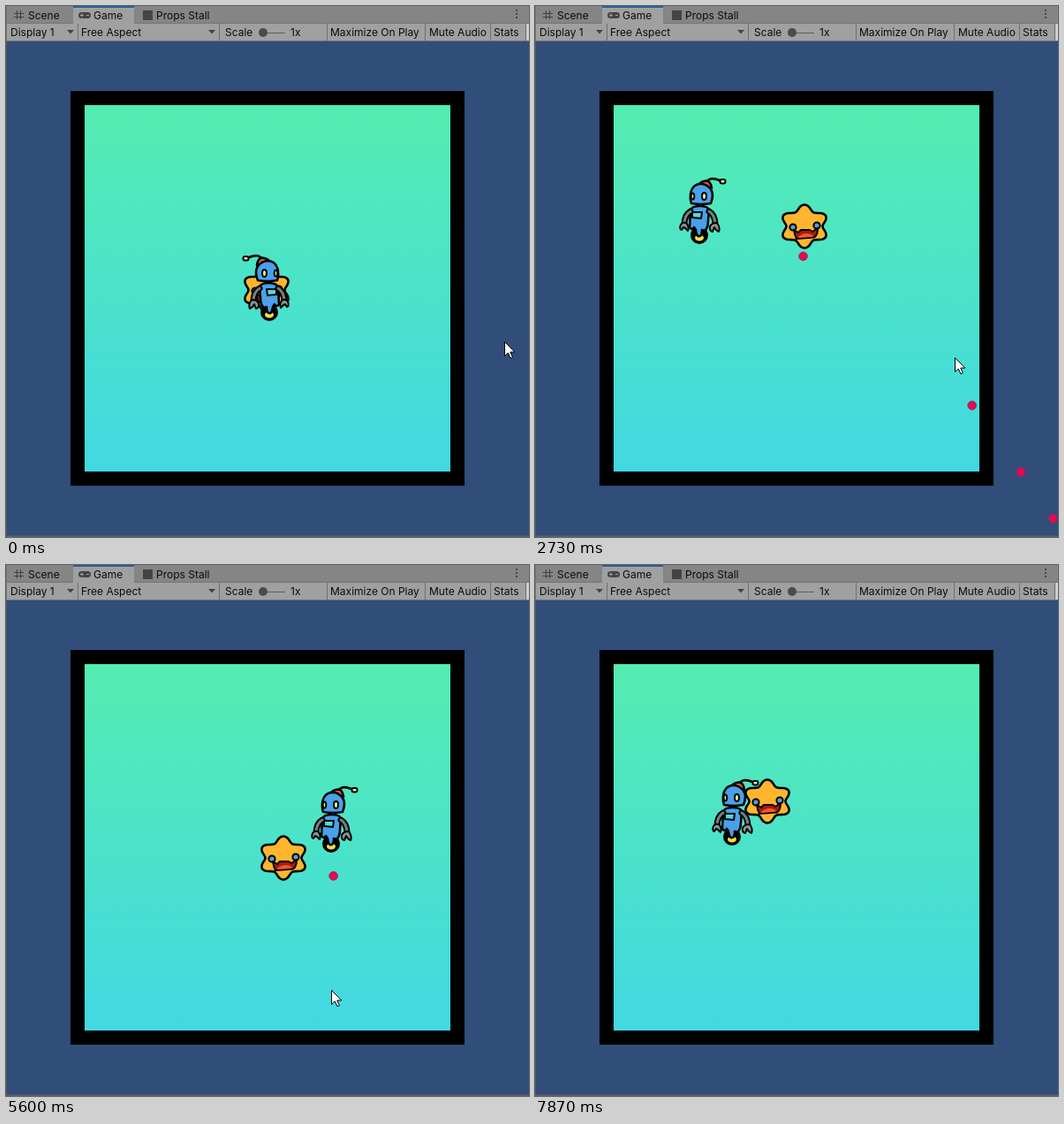
Write an HTML page that moves like this. It is 592x600 px and loops after 7.94 s.

```html
<!DOCTYPE html>
<html lang="en">
<head>
<meta charset="utf-8">
<title>Robot arena</title>
<style>
  html, body { margin: 0; width: 100%; height: 100%; overflow: hidden; background: #314d79; }
  svg { display: block; width: 592px; height: 600px; }
  text { font: 12px Inter, Roboto, sans-serif; fill: #0b0b0b; }
  .ink { stroke: #000; stroke-width: 2.6; stroke-linejoin: round; stroke-linecap: round; }
  .thin { stroke-width: 2; }
  .sep { stroke: #707070; }
</style>
</head>
<body>
<svg viewBox="0 0 592 600">
  <defs>
    <linearGradient id="floor" x2="0" y2="1">
      <stop stop-color="#54edb1"/>
      <stop offset="1" stop-color="#42d8e2"/>
    </linearGradient>
  </defs>

  <rect width="592" height="600" fill="#314d79"/>
  <rect x="73" y="96" width="446" height="446"/>
  <rect x="89" y="112" width="414" height="414" fill="url(#floor)"/>

  <g id="flower" class="ink">
    <path id="petals" fill="#ffb62e"/>
    <g class="thin">
      <circle cx="-13" cy="1" r="3.6" fill="#4a9fe8"/>
      <circle cx="14" cy="-1" r="3.6" fill="#4a9fe8"/>
      <path fill="#a81c0c" d="M-12 4L-7 7L-4 4H6L9 6L15 2Q15 10 11 12.5L-9 14Q-11 10-12 4Z"/>
    </g>
    <path fill="#f4572c" stroke="none" d="M-7 12Q1 5 10 10.500L8 12L-6 13Z"/>
  </g>

  <g id="shots" fill="#f0044e" stroke="#86305c"></g>

  <g id="robot" class="ink">
    <path fill="none" d="M-23 4Q-11-1-8 7"/>
    <rect x="-29.500" y="3" width="6" height="4.500" rx="2" class="thin" fill="#f8edc0"/>
    <path fill="#e0564e" d="M-14 13Q-13 5-8 4.500Q-2 5 1 9Z"/>
    <circle cy="66" r="8.700" fill="#000"/>
    <ellipse cy="69" rx="5" ry="3.500" fill="#f5dc4a" stroke="none"/>
    <path fill="none" stroke-width="3" d="M-2 30V35"/>
    <path fill="#4aa0ea" d="M-11 37Q-9 33-1 33Q9 33 10 38L11 57Q8 61 6 57L4 60Q3 68 0 67Q-3 67-3 60L-6 61Q-10 58-10 50Z"/>
    <path fill="#53d9dc" class="thin" d="M-3 40H8V46L-2 47Z"/>
    <g fill="none">
      <path stroke-width="7" d="M-11 39Q-18 43-18 54M10 39Q17 43 17 54"/>
      <path stroke="#767f86" stroke-width="3" d="M-11 39Q-18 43-18 54M10 39Q17 43 17 54"/>
    </g>
    <path fill="#8a9298" class="thin" d="M-20 52Q-24 57-22 62L-19 60L-17 57L-15 62Q-11 61-12 56Q-14 52-20 52ZM15 52Q11 56 13 61L16 58L18 57L20 60Q23 59 21 54Q19 51 15 52Z"/>
    <path fill="#4aa0ea" d="M-13 30Q-17 20-13 14Q-8 8-2 8Q7 8 9.500 17Q11 24 9 30Q-2 32-13 30Z"/>
    <ellipse cx="-5.500" cy="22" rx="2.500" ry="4" class="thin" fill="#f8e58a"/>
    <ellipse cx="7.500" cy="22" rx="1.800" ry="3.600" class="thin" fill="#f8e58a"/>
  </g>

  <path id="cursor" fill="#fff" stroke="#000" d="M-.5-.5v16l3.800-3.500l2.700 5.800l2.400-1.100l-2.600-5.700h5z"/>

  <rect width="1" height="600" fill="#555a62"/>
  <rect y="598.500" width="592" height="1.500" fill="#5c6068"/>

  <rect width="592" height="20" fill="#858585"/>
  <rect y="19" width="592" height="21" fill="#a0a0a0"/>
  <rect x="589" y="20" width="3" height="19" fill="#cfcfcf"/>
  <rect y="19" width="592" height="1" fill="#757575"/>
  <rect y="39" width="592" height="1" fill="#747474"/>
  <rect x="76" width="69" height="20" fill="#a0a0a0"/>
  <rect x="76" width="69" height="2" fill="#2c5d99"/>
  <path class="sep" d="M.5 0V40M81.500 20V40M241.500 20V40M363.500 20V40M474.500 20V40M548.500 20V40M588.500 20V40"/>
  <path stroke="#404040" d="M12.500 5V15M16.500 5V15M9 8.500H20M9 12.500H20"/>
  <rect x="82" y="7" width="14" height="7" rx="3.500" fill="#444"/>
  <path stroke="#a0a0a0" d="M84 10.500H88M86 8.500V12.500M91 10.500H94"/>
  <rect x="155" y="5" width="11" height="11" fill="#444"/>
  <path fill="#444" d="M69 27H77L73 31.500ZM229 27H237L233 31.500Z"/>
  <path stroke="#5e5e5e" d="M291 30.500H316"/>
  <circle cx="291" cy="30" r="5" fill="#4b4b4b"/>
  <path fill="#444" d="M577 4h2v2h-2zM577 8h2v2h-2zM577 12h2v2h-2z"/>
  <text x="25" y="15">Scene</text>
  <text x="99" y="15">Game</text>
  <text x="170" y="15">Props Stall</text>
  <text x="5" y="34">Display 1</text>
  <text x="85" y="34">Free Aspect</text>
  <text x="248" y="34">Scale</text>
  <text x="322" y="34">1x</text>
  <text x="367" y="34">Maximize On Play</text>
  <text x="479" y="34">Mute Audio</text>
  <text x="552" y="34">Stats</text>
</svg>
<script>
  const LOOP = 7940, HOLD = 330, STEP = 1000 / 15;
  const SHOT_SPEED = 0.6, MUZZLE = 33;
  const $ = id => document.getElementById(id);

  // Key points: time, x, y. The robot is steered in straight runs.
  const robotKeys = [
    [330, 298, 280], [930, 348, 280], [1540, 355, 191], [1730, 329, 165],
    [1960, 298, 139], [2730, 186, 193], [2950, 156, 221], [3300, 156, 266],
    [4330, 298, 395], [4500, 320, 397], [5150, 395, 312], [5597, 368, 249],
    [5870, 360, 212], [6463, 290, 132], [7400, 223, 241]
  ];
  const flowerKeys = [
    [330, 295, 321], [1730, 342, 287], [2730, 305, 249], [4330, 259, 306],
    [5597, 314, 331], [6463, 325, 286], [7863, 263, 267]
  ];
  const cursorKeys = [
    [330, 565, 380], [1730, 478, 414], [2730, 476, 398], [3300, 540, 250],
    [3600, 470, 117], [3870, 335, 162], [4015, 150, 261], [4140, 99, 291],
    [4330, 102, 290], [5000, 110, 200], [5350, 330, 440], [5597, 369, 481],
    [6150, 375, 481], [6463, 318, 515], [7300, 75, 605]
  ];
  const fireTimes = [
    450, 1605, 1912, 2003, 2150, 2540, 2900, 3150, 3600, 3867,
    4005, 4063, 4140, 4480, 4780, 5503, 5890, 6147, 6650
  ];

  // Index of the key that starts the run holding time t
  function runAt(keys, t) {
    let i = 0;
    while (i < keys.length - 2 && keys[i + 1][0] <= t) i++;
    return i;
  }

  function sample(keys, t, smooth) {
    const i = runAt(keys, t), a = keys[i], b = keys[i + 1];
    const before = keys[i - 1] || a, after = keys[i + 2] || b, span = b[0] - a[0];
    const k = Math.min(1, Math.max(0, (t - a[0]) / span));
    return [1, 2].map(c => {
      const line = a[c] + (b[c] - a[c]) * k;
      if (!smooth) return line;
      const rise = b[c] - a[c];
      const m0 = (b[c] - before[c]) / (b[0] - before[0]) * span - rise;
      const m1 = (after[c] - a[c]) / (after[0] - a[0]) * span - rise;
      return line + k * (1 - k) * (m0 * (1 - k) - m1 * k);
    });
  }

  const robotAt = t => sample(robotKeys, t, false);
  const flowerAt = t => sample(flowerKeys, t, true);
  const cursorAt = t => sample(cursorKeys, t, true);

  function facing(t) {
    const i = runAt(robotKeys, t);
    return robotKeys[i + 1][1] < robotKeys[i][1] ? -1 : 1;
  }

  function place(el, x, y, flip = 1) {
    el.setAttribute("transform", `translate(${x.toFixed(2)} ${y.toFixed(2)}) scale(${flip} 1)`);
  }

  // Six soft petals, one pointing up
  const outline = Array.from({ length: 72 }, (_, i) => {
    const angle = i * Math.PI / 36, r = 21.3 + 3.2 * Math.cos(6 * angle);
    return `${(1.13 * r * Math.sin(angle)).toFixed(2)} ${(-r * Math.cos(angle)).toFixed(2)}`;
  });
  $("petals").setAttribute("d", `M${outline.join("L")}Z`);

  // Each shot leaves the robot towards the cursor
  const shots = fireTimes.map(fire => {
    const [x, top] = robotAt(fire), y = top + MUZZLE, [cx, cy] = cursorAt(fire);
    const aim = Math.atan2(cy - y, cx - x);
    const el = document.createElementNS("http://www.w3.org/2000/svg", "circle");
    el.setAttribute("r", 4.8);
    $("shots").append(el);
    return { fire, x, y, vx: SHOT_SPEED * Math.cos(aim), vy: SHOT_SPEED * Math.sin(aim), el };
  });

  function draw(now) {
    let t = now % LOOP;
    t = t < HOLD ? 0 : HOLD + Math.floor((t - HOLD) / STEP + 0.001) * STEP;
    place($("robot"), ...robotAt(t), facing(t));
    place($("flower"), ...flowerAt(t));
    place($("cursor"), ...cursorAt(t).map(Math.round));
    for (const s of shots) {
      const age = t - s.fire;
      s.el.setAttribute("visibility", age >= 0 ? "visible" : "hidden");
      place(s.el, s.x + s.vx * age, s.y + s.vy * age);
    }
  }

  const start = performance.now();
  function tick() {
    draw(performance.now() - start);
    requestAnimationFrame(tick);
  }
  tick();
</script>
</body>
</html>
```
